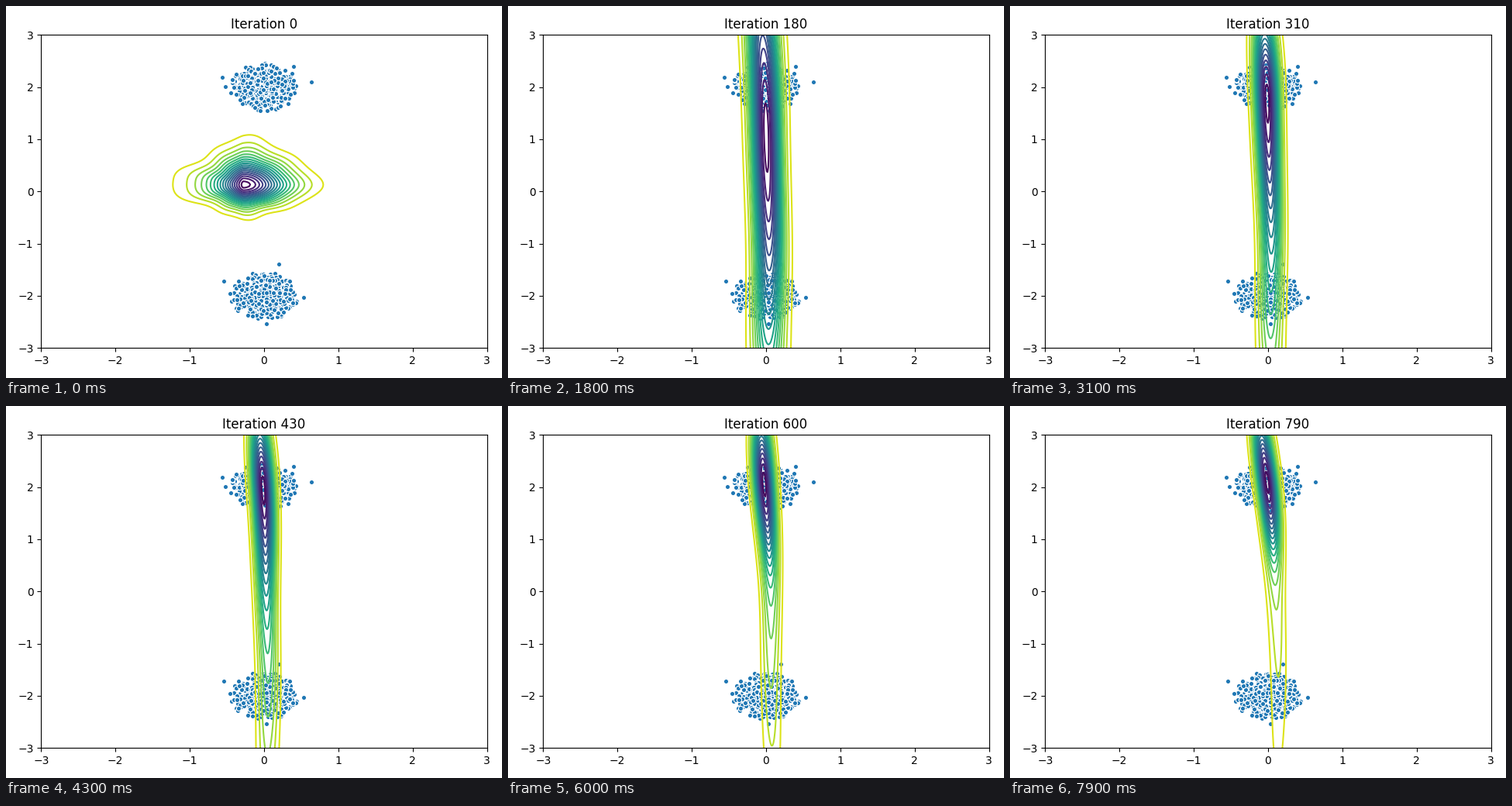
A matplotlib script that plays this animation: 640 by 480 pixels, repeating every 8000 ms.

```python
import matplotlib.pyplot as plt
import numpy as np
from matplotlib.animation import FuncAnimation

FRAMES, INTERVAL, STEP = 80, 100, 10
LEVELS = np.arange(1, 19) / 18.5
CX, CY = -0.28, 0.13  # peak of the untrained generator

X, Y = np.meshgrid(np.linspace(-1.4, 1.0, 241), np.linspace(-3.1, 3.1, 187))


def bell(u):
    return np.exp(-u * u / 2)


def blob(dx, dy):
    """Lopsided hill: sharp and long to the left, round to the right."""
    ex = np.where(dx < 0, np.abs(dx / 0.39) ** 1.3, (dx / 0.57) ** 2)
    ey = np.where(dy > 0, np.abs(dy / 0.48) ** 1.8, (dy / 0.365) ** 2)
    e, a = ex + ey, np.arctan2(dy, dx)
    bumps = 0.16 * np.cos(4 * a) + 0.06 * np.cos(9 * a)
    return np.exp(-e * (1 - np.tanh(e / 3) * bumps))


def column(it):
    """Tall ridge that narrows, then gathers around the upper cluster."""
    age = max(it - 100, 0)
    fade = np.exp(-age / 110)
    late = max(it - 180, 0)

    peak = 2.1 - 2.07 * fade
    up = 0.87 + 1.9 / (1 + (age / 130) ** 4)
    core = 0.95 * (1 - np.exp(-late / 320))
    down = 0.8 + np.exp(-late / 200)
    tail = 3.5 - 0.8 * fade
    d = Y - peak
    low = core * bell(d / down) + (1 - core) * bell(d / tail)
    height = np.where(d > 0, bell(d / up), low)

    lean = 0.065 + 0.1 * (age / 690) ** 3
    wobble = np.random.default_rng(it).uniform(0, 2 * np.pi)
    ridge = lean * np.tanh((2.2 - Y) / 2) - 0.025 + 0.006 * np.sin(1.7 * Y + wobble)
    width = (0.085 + 0.087 * np.exp(-age / 150)) * (1 + 0.012 * Y ** 2 - 0.008 * Y)
    u = (X - ridge) / width
    return height * (0.92 * bell(u / 0.93) + 0.08 * bell(u / 1.35))


def density(it):
    t = min(it / 100, 1)
    z = column(it) ** t
    if t < 1:
        z = z * blob((X - CX * (1 - t)) * 1.7 ** t, (Y - CY) * 0.1 ** t) ** (1 - t)
    return z / z.max()


def cluster(rng, cy, strays, n=650):
    p = rng.normal(0, 0.2, (2 * n, 2))
    p = p[np.hypot(*p.T) < 0.46][:n]
    return np.vstack([p + (0, cy), strays])


rng = np.random.default_rng(4)
points = np.vstack([
    cluster(rng, 2, [(-0.56, 2.19), (-0.52, 2.01), (0.64, 2.10), (0.395, 2.39)]),
    cluster(rng, -2, [(-0.54, -1.72), (0.20, -1.39), (0.53, -2.03), (0.03, -2.53)]),
])

fig, ax = plt.subplots(figsize=(6.4, 4.8), dpi=100)
ax.scatter(*points.T, s=20, color="C0", edgecolors="white", linewidths=0.8)
ax.set(xlim=(-3, 3), ylim=(-3, 3), xticks=range(-3, 4), yticks=range(-3, 4))
title = ax.set_title("Iteration 0")
fig.tight_layout()
shown = []


def update(i):
    while shown:
        shown.pop().remove()
    it = i * STEP
    shown.append(ax.contour(X, Y, density(it), levels=LEVELS, cmap="viridis_r",
                            vmin=0, vmax=1, linewidths=1.5))
    ax.set(xlim=(-3, 3), ylim=(-3, 3))
    title.set_text(f"Iteration {it}")
    return [title]


anim = FuncAnimation(fig, update, frames=FRAMES, interval=INTERVAL,
                     init_func=lambda: [], repeat=True, repeat_delay=0)
plt.show()
```
